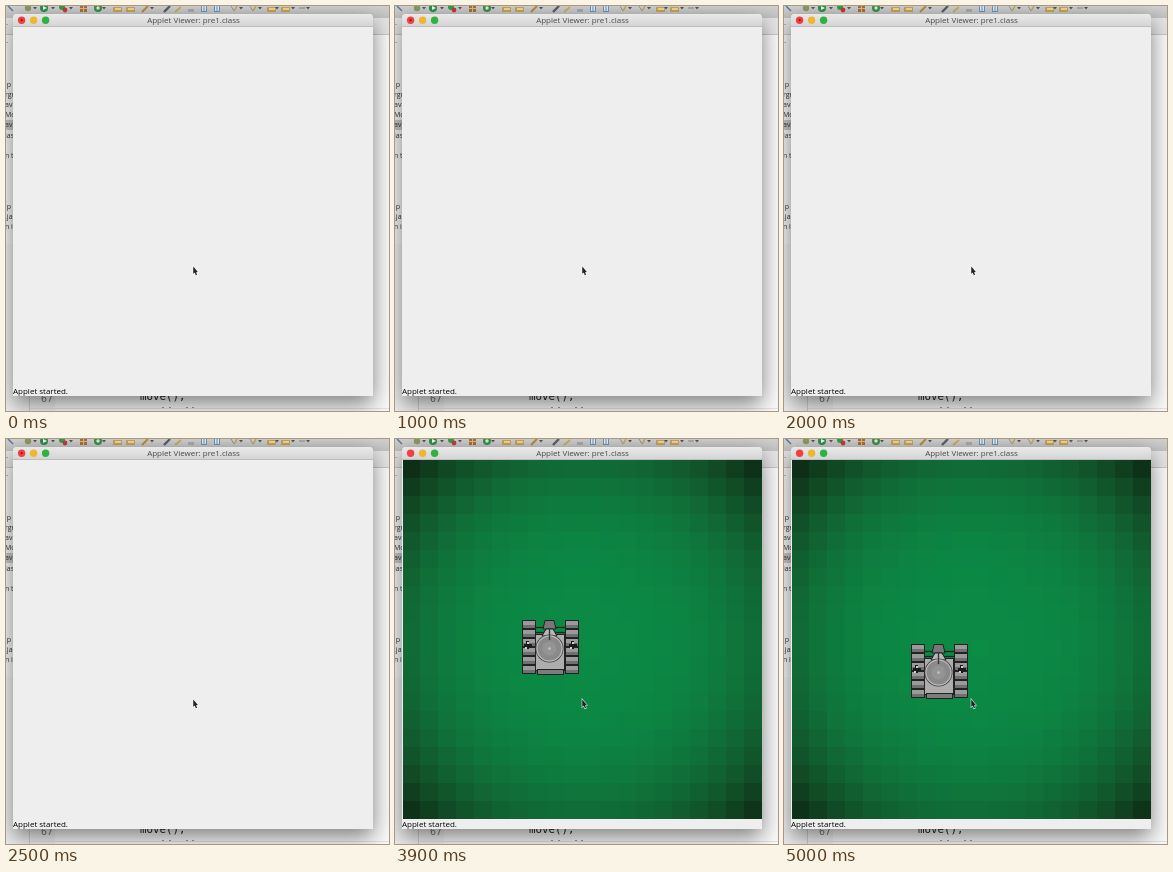
Animation, 383 px wide and 405 px high, one loop 5.1 s. Source, as an HTML page with a canvas:

```html
<!DOCTYPE html>
<html lang="en">
<head>
<meta charset="utf-8">
<title>Applet window</title>
<style>
html, body { margin: 0; width: 100%; height: 100%; overflow: hidden; background: #eee; }
canvas { display: block; }
</style>
</head>
<body>
<canvas id="stage" width="383" height="405"></canvas>
<script>
const ctx = document.getElementById('stage').getContext('2d');
const LOOP = 5100, STEP = 100, FIELD_START = 2900;
const SANS = '"Open Sans", "Noto Sans", sans-serif';
const MONO = '"DejaVu Sans Mono", monospace';

function rect(x, y, w, h, fill) {
  ctx.fillStyle = fill;
  ctx.fillRect(x, y, w, h);
}

function box(x, y, w, h, fill) {
  rect(x, y, w, h, '#222');
  rect(x + 1, y + 1, w - 2, h - 2, fill);
}

function disc(x, y, r, fill) {
  ctx.fillStyle = fill;
  ctx.beginPath();
  ctx.arc(x, y, r, 0, Math.PI * 2);
  ctx.fill();
}

function poly(points, fill, stroke, width = 1) {
  ctx.beginPath();
  points.forEach(([x, y]) => ctx.lineTo(x, y));
  ctx.closePath();
  if (fill) { ctx.fillStyle = fill; ctx.fill(); }
  if (stroke) { ctx.strokeStyle = stroke; ctx.lineWidth = width; ctx.stroke(); }
}

function line(x1, y1, x2, y2, color, width = 1) {
  ctx.strokeStyle = color;
  ctx.lineWidth = width;
  ctx.beginPath();
  ctx.moveTo(x1, y1);
  ctx.lineTo(x2, y2);
  ctx.stroke();
}

function text(str, x, y, font, fill, align = 'left') {
  ctx.font = font;
  ctx.fillStyle = fill;
  ctx.textAlign = align;
  ctx.fillText(str, x, y);
}

function vertical(y1, y2, from, to) {
  const g = ctx.createLinearGradient(0, y1, 0, y2);
  g.addColorStop(0, from);
  g.addColorStop(1, to);
  return g;
}

function drawToolbar() {
  rect(0, 0, 383, 12, vertical(0, 12, '#d0d0d0', '#c0c0c0'));
  line(2, 0, 7, 5, '#5b7c9b', 1.6);
  disc(22, 2, 3.2, '#8b9b62');
  disc(38, 2, 4, '#279447');
  poly([[37, 0], [41, 2], [37, 4]], '#fff');
  disc(56, 1, 3, '#3a9a4a');
  disc(59, 4, 2.4, '#c43c38');
  rect(74, 0, 7, 6, '#a8703c');
  line(77.5, 0, 77.5, 6, '#e0bc82');
  line(74, 2.5, 81, 2.5, '#e0bc82');
  disc(92, 2, 4, '#37914b');
  disc(92, 2, 1.7, '#dcebd8');
  for (const x of [107, 120, 261, 275]) {
    rect(x, 1, 9, 5, '#c9a45a');
    rect(x + 2, 2, 6, 2, '#f1d995');
  }
  line(136, 6, 142, 0, '#b88b3d', 2);
  line(158, 6, 164, 0, '#55606a', 2.4);
  line(169, 6, 175, 1, '#c9ae58', 2);
  rect(182, 3, 6, 3, '#aaa');
  for (const x of [195, 208]) {
    rect(x, 0, 6, 6, '#6d94bd');
    rect(x + 1, 0, 4, 5, '#e3edf5');
    line(x + 3, 0, x + 3, 5, '#6d94bd');
  }
  for (const x of [225, 244]) {
    line(x, 0, x + 3, 5, '#8f969c');
    line(x + 3, 5, x + 6, 0, '#c5a85a', 1.5);
  }
  line(293, 2, 299, 2, '#aaa', 2);
  for (const x of [29, 47, 65, 98, 146, 235, 254, 271, 287, 302])
    poly([[x - 2, 1], [x + 2, 1], [x, 3.5]], '#555');
}

function drawBackdrop() {
  rect(0, 0, 383, 405, '#fafafa');
  rect(0, 12, 383, 16, '#e4e4e4');
  line(0, 28.5, 383, 28.5, '#c6c6c6');
  rect(0, 29, 7, 209, '#f7f7f7');
  rect(0, 238, 7, 167, '#f2f2f2');
  rect(0, 114, 7, 10, '#c9c9cc');
  const scraps = [[81, ' p'], [91, 'rgr'], [101, 'ava'], [111, 'Mo'], [121, 'av'],
    [132, 'las'], [152, 'n t'], [203, ' p'], [213, '.ja'], [223, 'n i']];
  for (const [y, str] of scraps) text(str, -1, y, '7px ' + SANS, '#333');
  text('-', 0, 20, '7px ' + SANS, '#777');
  text('-', 0, 38, '7px ' + SANS, '#777');

  rect(0, 389, 24, 16, '#eee');
  rect(24, 389, 25, 16, '#f2f2f2');
  line(23.5, 389, 23.5, 405, '#cfcfcf');
  text('67', 35, 395.5, '10px ' + MONO, '#777');
  text('move();', 134, 394, '10.8px ' + MONO, '#222');
  line(24, 402.5, 383, 402.5, '#e2e2e2');
  for (const x of [156, 163, 180, 186]) rect(x, 401, 2, 1, '#999');
  drawToolbar();
}

function drawWindow(active) {
  ctx.save();
  ctx.shadowColor = 'rgba(0,0,0,.5)';
  ctx.shadowBlur = 22;
  ctx.shadowOffsetY = 8;
  ctx.fillStyle = '#eee';
  ctx.beginPath();
  ctx.roundRect(7, 8, 360, 382, [4, 4, 0, 0]);
  ctx.fill();
  ctx.restore();
  ctx.fillStyle = vertical(8, 21, '#e9e9e9', '#d3d3d3');
  ctx.beginPath();
  ctx.roundRect(7, 8, 360, 13, [4, 4, 0, 0]);
  ctx.fill();
  line(7, 20.5, 367, 20.5, '#bdbdbd');
  ['#f23f40', '#f0b62e', '#2db33f'].forEach((color, i) => disc(15.6 + i * 12, 14.2, 3.7, color));
  if (!active) disc(15.6, 14.2, 1.1, '#8e1714');
  text('Applet Viewer: pre1.class', 187.5, 17, '8px ' + SANS, '#484848', 'center');
  text('Applet started.', 7, 388, '8px ' + SANS, '#000');
}

function drawField() {
  const edgeX = i => Math.round(7.5 + i * 17.95);
  const edgeY = i => Math.round(21 + i * 17.95);
  for (let row = 0; row < 20; row++) {
    for (let col = 0; col < 20; col++) {
      const d = Math.hypot(col - 9.6, row - 9.6);
      const light = 1 - 0.73 * Math.pow(d / 14, 3.2);
      const lift = row === 10 && col === 10 ? 4 : 0;
      const haze = 45 * light * (1 - light);
      const rgb = [11 * light + haze, (137 + lift) * light, 69 * light].map(Math.round);
      const x = edgeX(col), y = edgeY(row);
      rect(x, y, edgeX(col + 1) - x, edgeY(row + 1) - y, `rgb(${rgb})`);
    }
  }
}

function drawTrack(x) {
  rect(x, 0, 14, 54, '#222');
  for (let i = 0; i < 6; i++) {
    const y = i * 9;
    rect(x + 1, y + 1, 12, 4, '#9a9a9a');
    rect(x + 1, y + 5, 12, 3, '#707070');
  }
}

function drawTank(y) {
  ctx.save();
  ctx.translate(127, y);
  line(13, 7.5, 44, 7.5, '#222', 1.3);
  line(13, 12.5, 44, 12.5, '#222', 1.3);
  drawTrack(0);
  drawTrack(43);
  box(13, 14, 30, 37, '#adadad');
  box(15, 49, 27, 6, '#7c7c7c');
  poly([[23, 0.5], [32, 0.5], [34, 9], [21, 9]], '#777', '#222');
  poly([[24, 9], [31, 9], [35, 16], [20, 16]], '#b8b8b8', '#222');
  disc(27.5, 28.5, 14, '#444');
  disc(27.5, 28.5, 13.2, '#bdbdbd');
  disc(27.5, 28.5, 12, '#8a8a8a');
  disc(27.5, 28.5, 7, '#949494');
  disc(27.5, 28.5, 1.5, '#bbb');
  line(27.5, 9, 27.5, 20, '#333', 1.3);
  for (const x of [4, 49]) {
    rect(x, 21, 3, 8, '#1a1a1a');
    rect(x - 2, 24, 8, 3, '#1a1a1a');
    rect(x + 1, 22, 2, 2, '#ccc');
    rect(x - 1, 27, 2, 2, '#ccc');
  }
  ctx.restore();
}

function drawCursor() {
  const arrow = [[187.3, 260.5], [187.3, 267.8], [188.8, 266.6], [189.9, 269.3], [191, 268.8], [190, 266.2], [191.8, 266]];
  poly(arrow, '#222', 'rgba(255,255,255,.75)', 1.3);
  poly(arrow, '#222');
}

function tankY(t) {
  return t < 4400 ? 169 + (t - 3400) * 0.024 : 193 + (t - 4400) * 0.02;
}

function frame(now) {
  const t = Math.floor((now % LOOP) / STEP) * STEP;
  const active = t >= FIELD_START;
  drawBackdrop();
  drawWindow(active);
  if (active) {
    drawField();
    drawTank(Math.round(tankY(t)));
  }
  drawCursor();
}

const start = performance.now();
function tick() {
  frame(performance.now() - start);
  requestAnimationFrame(tick);
}
tick();
</script>
</body>
</html>
```
